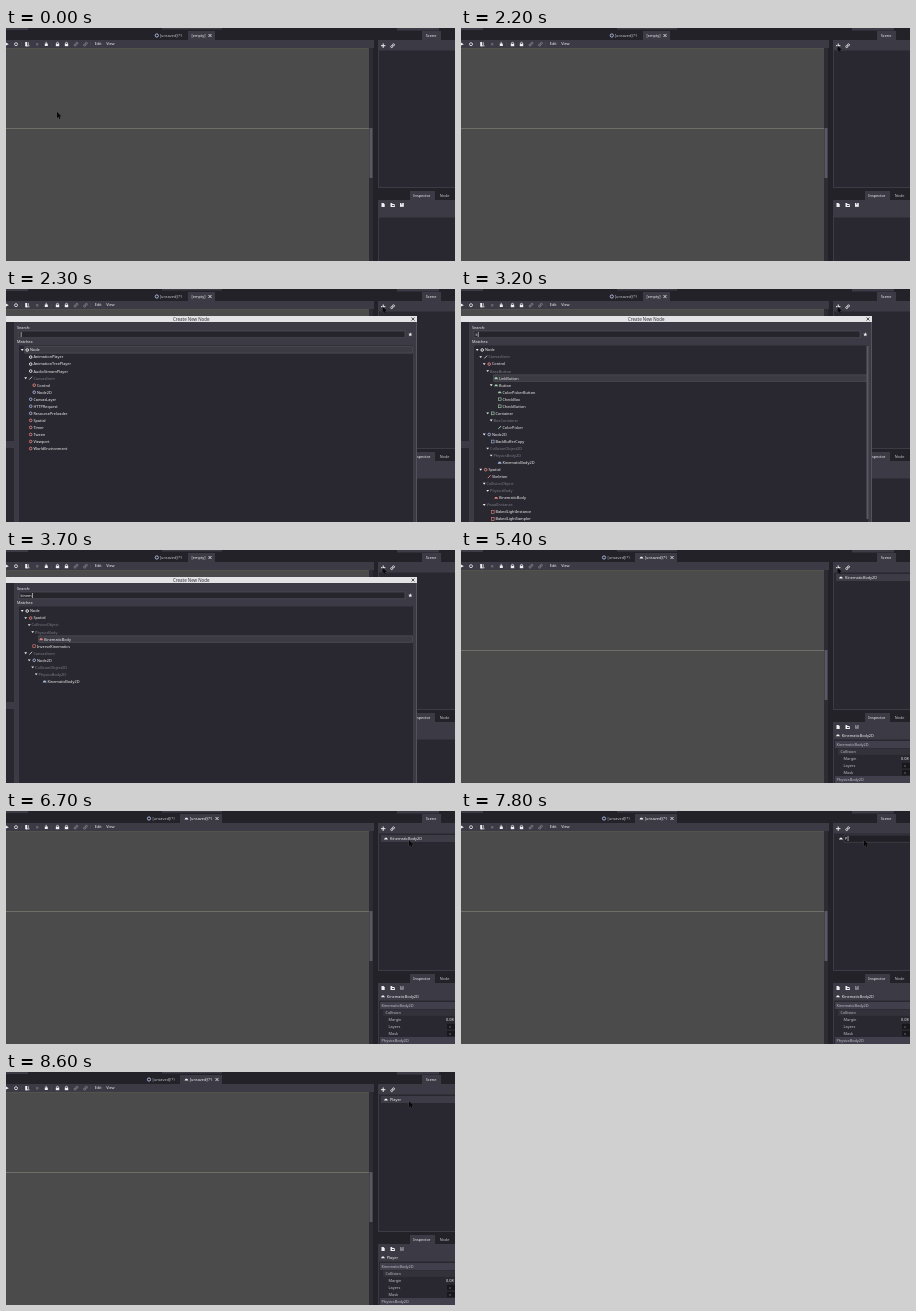
Animation of 449 by 233 pixels, one loop 8.8 s. Source, as an HTML page with a canvas:

```html
<!DOCTYPE html>
<html lang="en">
<head>
<meta charset="utf-8">
<title>Create a node</title>
<style>
  html, body { margin: 0; width: 100%; height: 100%; overflow: hidden; background: #222229; }
  canvas { display: block; }
</style>
</head>
<body>
<canvas id="stage" width="449" height="233"></canvas>
<script>
const ctx = document.getElementById('stage').getContext('2d');
const LOOP = 8800, STEP = 100, ROW = 7.04;
const BRIGHT = '#f0f0f2', DIM = '#7c7c85', MID = '#c0c0c8';
const PANEL = '#3b3a45', LIST = '#292830', GAP = '#232228';
const GREEN = '#9fd0a8', BLUE = '#a9b4dc', RED = '#e58080';

// Rows are "depth name"; a leading - is abstract without icon, ~ abstract with icon.
const parseTree = text => text.trim().split(/\s+/).map(entry => {
  const [, depth, kind, name] = entry.match(/^(\d)([-~]?)(.+)$/);
  return { depth: +depth, kind, name };
});

const allNodes = parseTree(`0Node 1AnimationPlayer 1AnimationTreePlayer 1AudioStreamPlayer
  1~CanvasItem 2Control 2Node2D 1CanvasLayer 1HTTPRequest 1ResourcePreloader 1Spatial
  1Timer 1Tween 1Viewport 1WorldEnvironment`);
const matchesK = parseTree(`0Node 1~CanvasItem 2Control 3-BaseButton 4LinkButton 4Button
  5ColorPickerButton 5CheckBox 5CheckButton 3Container 4-BoxContainer 5ColorPicker
  2Node2D 3BackBufferCopy 3-CollisionObject2D 4-PhysicsBody2D 5KinematicBody2D
  1Spatial 2Skeleton 2-CollisionObject 3-PhysicsBody 4KinematicBody
  2-VisualInstance 3BakedLightInstance 3BakedLightSampler`);
const matchesKinema = parseTree(`0Node 1Spatial 2-CollisionObject 3-PhysicsBody 4KinematicBody
  2InverseKinematics 1~CanvasItem 2Node2D 3-CollisionObject2D 4-PhysicsBody2D 5KinematicBody2D`);

function rect(x, y, w, h, color) {
  ctx.fillStyle = color;
  ctx.fillRect(x, y, w, h);
}

function frame(x, y, w, h, color) {
  ctx.strokeStyle = color;
  ctx.lineWidth = 0.6;
  ctx.strokeRect(x, y, w, h);
}

function text(str, x, centerY, color = BRIGHT, size = 3.85) {
  ctx.font = `500 ${size}px "Noto Sans", sans-serif`;
  ctx.fillStyle = color;
  ctx.fillText(str, x, centerY + size * 0.36);
  return ctx.measureText(str).width;
}

function line(points, color, width = 0.8) {
  ctx.strokeStyle = color;
  ctx.lineWidth = width;
  ctx.beginPath();
  points.forEach(([x, y]) => ctx.lineTo(x, y));
  ctx.stroke();
}

function poly(points, color) {
  ctx.fillStyle = color;
  ctx.beginPath();
  points.forEach(([x, y]) => ctx.lineTo(x, y));
  ctx.fill();
}

function ring(x, y, r, color, width = 1) {
  ctx.strokeStyle = color;
  ctx.lineWidth = width;
  ctx.beginPath();
  ctx.arc(x, y, r, 0, Math.PI * 2);
  ctx.stroke();
}

function cross(x, y, color = BRIGHT, r = 1.5) {
  line([[x - r, y - r], [x + r, y + r]], color);
  line([[x + r, y - r], [x - r, y + r]], color);
}

const body = (x, y, color = BRIGHT) =>
  poly([[x - 2, y + 1], [x - 1, y - 0.8], [x + 0.8, y - 0.8], [x + 2, y + 1]], color);

function lock(x, y, color) {
  rect(x - 1.7, y - 0.2, 3.4, 2.4, color);
  ring(x, y - 0.6, 1.1, color, 0.7);
}

function link(x, y, color) {
  ring(x - 0.9, y + 0.9, 1, color, 0.8);
  ring(x + 0.9, y - 0.9, 1, color, 0.8);
}

function page(x, y, color) {
  poly([[x - 1.5, y - 2], [x + 0.5, y - 2], [x + 1.7, y - 0.8], [x + 1.7, y + 2], [x - 1.5, y + 2]], color);
}

function toolbar() {
  rect(0, 12, 368, 8, PANEL);
  poly([[0, 14.5], [2.8, 16.2], [0, 17.5]], BRIGHT);
  ring(10, 16.2, 1.5, BRIGHT, 0.8);
  rect(19.2, 14, 2, 4.3, BRIGHT);
  line([[20, 17.8], [23.5, 17.8]], BRIGHT);
  line([[22.4, 14.2], [22.4, 17]], MID);
  rect(30, 15, 2.4, 2.5, '#62626b');
  rect(38.8, 15.5, 3, 2.5, BRIGHT);
  line([[40.2, 13.8], [40.2, 17]], BRIGHT);
  lock(51.5, 16, BRIGHT);
  lock(60.5, 16, BRIGHT);
  link(70, 16.2, '#85858e');
  link(79.5, 16.2, '#85858e');
  for (const x of [15, 45.5, 84.5]) rect(x, 14, 0.5, 4.5, '#4b4b56');
  text('Edit', 88.8, 16);
  text('View', 100.2, 16);
}

function tabs(created) {
  rect(0, 0, 449, 12, GAP);
  rect(0, 0, 22, 2, PANEL);
  rect(156, 0, 60, 1.5, PANEL);
  rect(391, 0, 42, 2.5, PANEL);
  if (created) {
    rect(174, 3, 42, 9, PANEL);
    ring(143, 7.5, 1.6, BLUE);
    text('[unsaved](*)', 146.5, 7.5, MID);
    body(180.5, 7.5);
    text('[unsaved](*)', 183.8, 7.5);
    cross(211, 7.5);
  } else {
    rect(182, 3, 27, 9, PANEL);
    ring(150.8, 7.5, 1.6, BLUE);
    text('[unsaved](*)', 153.8, 7.5, MID);
    text('[empty]', 185.5, 7.5);
    cross(204, 7.5);
  }
}

function viewport() {
  rect(0, 20, 363, 213, '#4b4b4b');
  rect(0, 20, 363, 0.7, '#57574f');
  rect(0, 100, 363, 0.9, '#73736c');
  rect(363, 20, 4, 213, '#2d2c34');
  rect(363.5, 100, 3, 50, '#5a5963');
  rect(367, 12, 5, 221, GAP);
}

function sceneDock(t, created) {
  rect(372, 3, 77, 230, GAP);
  rect(416, 3, 19, 9, PANEL);
  text('Scene', 419.7, 7.5);
  rect(372, 12, 77, 148, PANEL);
  rect(373, 22.5, 76, 136.5, LIST);
  line([[375, 17.7], [379.4, 17.7]], BRIGHT, 1);
  line([[377.2, 15.5], [377.2, 19.9]], BRIGHT, 1);
  link(386.6, 17.7, BRIGHT);
  if (!created) return;

  const editing = t >= 7000 && t < 8600;
  if (!editing) rect(375, 24, 74, 7, '#3d3c46');
  body(380, 27.5);
  if (!editing) {
    text(t >= 8600 ? 'Player' : 'KinematicBody2D', 384, 27.5);
    return;
  }
  rect(383, 24, 66, 7.2, '#202026');
  frame(383, 24, 67, 7.2, '#484852');
  const typed = 'Player'.slice(0, stepAt(t, [7800, 7900, 8100, 8200, 8300, 8400]));
  if (!typed) rect(384, 25, 32, 5.2, '#505867');
  const width = text(typed || 'KinematicBody2D', 384, 27.5);
  rect(384.4 + width, 25, 0.6, 5, BRIGHT);
}

function inspector(t, created) {
  rect(404, 163, 25, 9, PANEL);
  text('Inspector', 407.2, 167.5);
  text('Node', 433.7, 167.5, MID);
  rect(372, 172, 77, 61, PANEL);
  page(377, 177, BRIGHT);
  poly([[384.5, 175], [386, 175], [386.5, 176], [388.5, 176], [389, 179], [384.5, 179]], BRIGHT);
  rect(386, 177, 2, 0.9, PANEL);
  rect(394, 175, 3.8, 3.8, created ? '#85858e' : BRIGHT);
  rect(395.4, 175, 0.8, 1.6, PANEL);
  rect(373, 189.5, 76, 43.5, LIST);
  if (!created) return;

  body(377, 185.2);
  text(t >= 8600 ? 'Player' : 'KinematicBody2D', 380.8, 185.2);
  rect(374, 191, 75, 7, '#413f4b');
  text('KinematicBody2D', 375.5, 194.5, MID);
  rect(377, 198.5, 72, 6.3, '#33323b');
  text('Collision', 379.5, 201.5, MID);
  text('Margin', 382.5, 208.7, MID);
  text('0.08', 440, 208.7, BRIGHT);
  for (const [label, y] of [['Layers', 215.6], ['Mask', 222.6]]) {
    text(label, 382.5, y, MID);
    rect(441, y - 2.7, 8, 5.4, '#17171c');
    rect(443, y - 0.4, 2, 1.6, '#494953');
  }
  rect(374, 226, 75, 7, '#413f4b');
  text('PhysicsBody2D', 375.5, 229.5, MID);
}

function tree(rows, selected, top = 61) {
  let branch = BRIGHT;
  rows.forEach(({ depth, kind, name }, i) => {
    const y = top + i * ROW, x = 16.2 + depth * 3.5;
    if (name === 'Spatial' || name === 'Control') branch = RED;
    if (name === 'BaseButton') branch = GREEN;
    if (name === 'Node2D') branch = BLUE;
    if (name === selected) {
      rect(x + 2.5, y - 3.3, 404 - x, 6.4, '#3c3b44');
      frame(x + 2.5, y - 3.3, 404 - x, 6.4, '#55545e');
    }
    if (rows[i + 1]?.depth > depth) {
      poly([[x - 1.4, y - 0.9], [x + 1.4, y - 0.9], [x, y + 1]], BRIGHT);
    }
    if (kind !== '-') nodeIcon(name, x + 5, y, kind ? MID : branch);
    text(name, kind === '-' ? x + 2.4 : x + 7.7, y, kind ? DIM : BRIGHT);
  });
}

function nodeIcon(name, x, y, color) {
  if (/Container|Copy|Check|Light|Inverse/.test(name)) {
    frame(x - 1.4, y - 1.4, 2.8, 2.8, color);
  } else if (/Kinematic|Button/.test(name)) {
    body(x, y, color);
  } else if (/CanvasItem|Picker|Skeleton/.test(name)) {
    line([[x - 1.4, y + 1.4], [x + 1.4, y - 1.4]], color, 1);
  } else {
    ring(x, y, 1.3, color, 0.9);
  }
}

function dialog(t) {
  rect(0, 33, 8, 200, LIST);
  rect(0, 152, 8, 7, PANEL);
  rect(8, 33, 403, 200, PANEL);
  rect(0, 27, 411, 6, '#e3e3e5');
  rect(410.2, 33, 0.8, 200, '#5b5a64');
  text('Create New Node', 167, 30.2, '#33323a', 4.45);
  cross(407, 30, '#33323a');
  text('Search:', 11, 38.2);
  rect(13, 42, 386, 6.8, '#26252c');
  frame(13, 42, 386, 6.8, '#55545e');
  const star = Array.from({ length: 10 }, (_, i) => {
    const r = i % 2 ? 0.9 : 2.2, a = i * Math.PI / 5 - Math.PI / 2;
    return [404.3 + r * Math.cos(a), 45.5 + r * Math.sin(a)];
  });
  poly(star, BRIGHT);
  text('Matches:', 11, 53);
  rect(13, 56.5, 394, 176.5, LIST);

  const count = stepAt(t, [3100, 3300, 3400, 3500, 3600, 3800]);
  const width = text('kinema'.slice(0, count), 14.5, 45.4);
  rect(14.8 + width, 43, 0.6, 5, BRIGHT);
  if (count === 0) {
    tree(allNodes, 'Node');
  } else if (count < 3) {
    tree(matchesK, 'LinkButton');
    rect(405.5, 57, 2, 173, '#5a5963');
  } else {
    const stops = ['KinematicBody', 'InverseKinematics', 'Node2D', 'KinematicBody2D'];
    tree(matchesKinema, stops[stepAt(t, [4600, 4700, 4900])]);
  }
}

const stepAt = (t, times) => times.filter(time => t >= time).length;

function cursorAt(t) {
  const glide = (from, to, start, end) => {
    const u = Math.min(1, Math.max(0, (t - start) / (end - start)));
    const eased = u * u * (3 - 2 * u);
    return from.map((v, i) => v + (to[i] - v) * eased);
  };
  if (t < 5900) return glide([51, 84], [376.5, 17.5], 1100, 2000);
  if (t >= 6200) return glide([449, 48], [403, 29.3], 6100, 6500);
  return null;
}

function pointer([x, y]) {
  const shape = [[0, 0], [0, 6], [1.4, 4.8], [2.4, 7], [3.4, 6.5], [2.5, 4.5], [4.3, 4.3]]
    .map(([dx, dy]) => [x + dx, y + dy]);
  line([...shape, shape[0]], '#55555a', 0.4);
  poly(shape, '#08080a');
}

function draw(now) {
  const t = Math.floor((now % LOOP) / STEP) * STEP;
  const created = t >= 5400, dialogOpen = t >= 2300 && !created;
  rect(0, 0, 449, 233, GAP);
  tabs(created);
  viewport();
  toolbar();
  sceneDock(t, created);
  inspector(t, created);
  if (dialogOpen) dialog(t);
  const position = cursorAt(t);
  if (position) pointer(position);
}

const start = performance.now();
function tick() {
  draw(performance.now() - start);
  requestAnimationFrame(tick);
}
tick();
</script>
</body>
</html>
```
